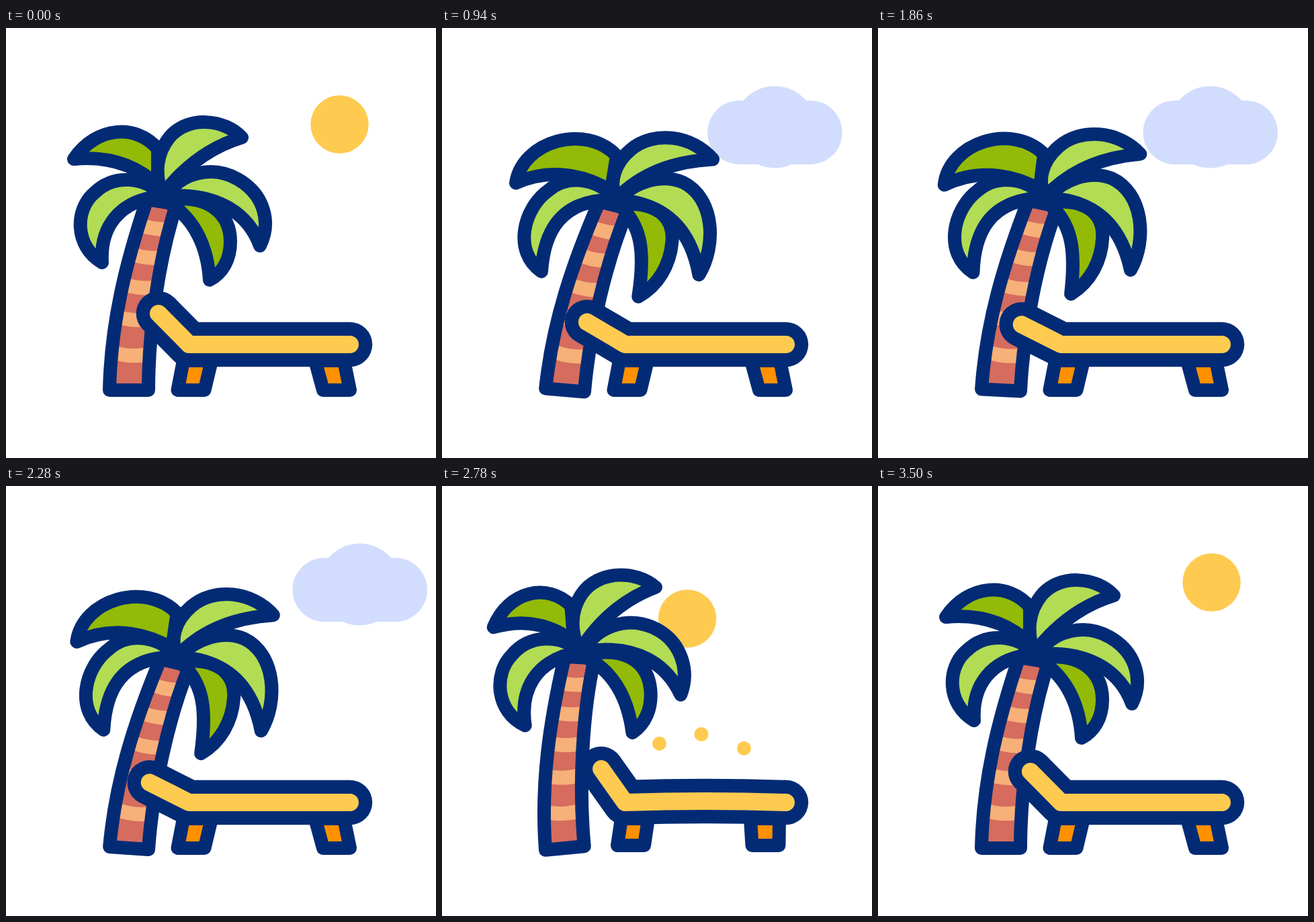
Animation, 640 px wide and 640 px high, one loop 3600 ms. Source, as an HTML page:

```html
<!DOCTYPE html>
<html lang="en">
<head>
<meta charset="utf-8">
<title>Palm and lounger</title>
<style>
  html, body { margin: 0; width: 100%; height: 100%; overflow: hidden; background: #fff; }
  svg { display: block; width: 100vw; height: 100vh; }
  .line { stroke: #032b75; stroke-width: 20; stroke-linejoin: round; stroke-linecap: round; }
  .band { fill: none; stroke: #f7b078; stroke-width: 21; }
  .seat { fill: none; stroke-linecap: round; stroke-linejoin: round; }
  .sun { fill: #fecb50; }
</style>
</head>
<body>
<svg viewBox="0 0 640 640">
  <defs>
    <clipPath id="bark"><path d="M154 539C156 440 178 350 210 255L254 262C228 340 212 450 212 539Z"/></clipPath>
  </defs>
  <circle id="sun" class="sun" r="43.2"/>
  <g id="cloud" fill="#d2ddfd">
    <rect x="394.5" y="108" width="200.5" height="95" rx="47.5"/>
    <circle cx="494.5" cy="147.500" r="61"/>
  </g>
  <g id="palm">
    <g id="trunk" clip-path="url(#bark)">
      <path fill="#d56c5e" d="M120 240H280V560H120Z"/>
    </g>
    <path class="line" fill="none" d="M154 539C156 440 178 350 210 255L254 262C228 340 212 450 212 539Z"/>
    <g id="leaves"></g>
  </g>
  <g id="drops"></g>
  <path id="legL" class="line" fill="#ff9000"/>
  <path id="legR" class="line" fill="#ff9000"/>
  <path id="frame" class="seat" stroke="#032b75" stroke-width="66.5"/>
  <path id="pad" class="seat" stroke="#fecb50" stroke-width="26"/>
</svg>
<script>
const LOOP = 3600;
const $ = id => document.getElementById(id);
const clamp = x => Math.min(1, Math.max(0, x));
const mix = (a, b, k) => a + (b - a) * k;

function add(parent, tag, attrs) {
  const el = document.createElementNS('http://www.w3.org/2000/svg', tag);
  for (const name in attrs) el.setAttribute(name, attrs[name]);
  return parent.appendChild(el);
}

// Smooth interpolation through [time, value] keys.
function track(...keys) {
  return t => {
    if (t <= keys[0][0]) return keys[0][1];
    for (let i = 1; i < keys.length; i++) {
      const [t0, a] = keys[i - 1], [t1, b] = keys[i];
      if (t <= t1) {
        const p = (t - t0) / (t1 - t0);
        return mix(a, b, p * p * (3 - 2 * p));
      }
    }
    return keys[keys.length - 1][1];
  };
}

const lean = track([60, 0], [900, 5], [1330, 0], [2230, 4.4], [2670, -6.5], [3190, 2.5], [3500, 0]);
const droop = track([0, 0], [850, 1], [2290, 1], [2800, .15], [3200, 0]);
const curl = track([2400, 0], [2700, 1], [2800, 1], [3250, 0]);
const recline = track([150, 0], [1260, -18.5], [2300, -18.5], [2720, 10], [3150, -2], [3450, 0]);
const hop = track([2430, 0], [2740, 1.03], [3200, -.25], [3500, 0]);

[[221, 299, 4], [209, 342, 3.5], [199, 387, 3], [190, 435, 2], [184, 488, 2]].forEach(([x, y, tilt]) =>
  add($('trunk'), 'path', { class: 'band', d: `M${x - 30} ${y - 5 - tilt}Q${x} ${y + 4} ${x + 30} ${y - 5 + tilt}` }));

// A leaf blends between a calm and a windblown outline.
const leaves = [];
function leaf(fill, calm, windy) {
  const nums = s => s.match(/[\d.]+/g).map(Number);
  leaves.push({ el: add($('leaves'), 'path', { class: 'line', fill }), calm, a: nums(calm), b: nums(windy) });
}
const DARK = '#92ba07', LIGHT = '#b2dc53';
leaf(DARK, 'M101 195C135 145 195 143 226 180L226 235C195 205 155 190 101 195Z',
           'M84 238C88 175 180 140 230 185L226 238C195 222 140 207 84 238Z');
leaf(LIGHT, 'M235 250C205 220 160 218 132 245C102 270 102 325 143 349C140 300 165 255 235 250Z',
            'M235 250C205 220 160 218 133 245C98 275 88 340 133 366C132 310 150 255 235 250Z');
leaf(DARK, 'M250 255C300 250 334 275 334 318C334 345 322 365 303 375C300 325 280 285 245 262Z',
           'M250 255C300 250 323 272 323 305C323 340 308 372 280 391C284 330 278 290 245 262Z');
leaf(LIGHT, 'M236 252C262 212 310 205 345 225C385 248 395 290 378 324C362 280 320 245 240 250Z',
            'M236 252C258 222 298 205 332 216C380 235 390 305 367 351C352 295 318 250 240 250Z');
leaf(LIGHT, 'M351 163C325 135 270 130 243 163C224 187 221 215 232 250C258 215 295 180 351 163Z',
            'M373 178C340 145 282 142 250 174C227 197 222 225 234 250C262 215 305 187 373 178Z');

const drops = [[323.5, 92], [386, 106], [449.5, 85]].map(([cx, rise]) =>
  ({ rise, el: add($('drops'), 'circle', { class: 'sun', cx, r: 10.5 }) }));

function drawPalm(t) {
  const w = droop(t), c = curl(t);
  $('palm').setAttribute('transform', `rotate(${lean(t)} 183 540)`);
  leaves.forEach(({ el, calm, a, b }, n) => {
    let i = 0;
    el.setAttribute('d', calm.replace(/[\d.]+/g, () => {
      let v = mix(a[i], b[i], w);
      if (n === 0 && i % 2 === 0) v += c * .08 * (226 - v);
      i++;
      return v.toFixed(2);
    }));
  });
}

function drawSky(t) {
  // The sun slips behind the palm and comes back along the same arc.
  const s = t < 1800 ? 1 - clamp(t / 588) ** 3 : 1 - (1 - clamp((t - 2652) / 588)) ** 3;
  $('sun').setAttribute('cx', mix(222, 496.5, s));
  $('sun').setAttribute('cy', mix(232, 143.5, s ** 1.44));
  $('sun').style.display = s > 0 ? '' : 'none';

  const away = t < 1440 ? 1065 - t : t - 1818;
  const dx = Math.min(290, (Math.max(0, away) * .00687) ** 3);
  $('cloud').setAttribute('transform', `translate(${dx} ${-dx / 32})`);
  $('cloud').style.display = dx < 260 ? '' : 'none';
}

function drawChair(t) {
  const k = hop(t), turn = recline(t);
  const ang = (45.3 + turn) * Math.PI / 180, len = 64.8 - turn * (turn > 0 ? .38 : .06);
  const x = 272.5 - len * Math.cos(ang), y = 471 - len * Math.sin(ang);
  const d = `M${x} ${y}L272.5 471Q392 ${471 - 4 * k} 512 471`;
  $('frame').setAttribute('d', d);
  $('pad').setAttribute('d', d);

  const foot = 539 - 4 * k, l = 5.5 * k, r = -10.5 * k;
  $('legL').setAttribute('d', `M${264 + 3 * k} 495L${255.5 + l} ${foot}H${295.5 + l}L${306 + k} 495Z`);
  $('legR').setAttribute('d', `M${460 - k} 495L${472 + r} ${foot}H${512 + r}L${503 - k} 495Z`);

  const p = clamp((t - 2640) / 300);
  drops.forEach(({ el, rise }) => {
    el.setAttribute('cy', 475 - rise * 4 * p * (1 - p));
    el.style.display = p > 0 && p < 1 ? '' : 'none';
  });
}

let start;
function tick(now) {
  start ??= now;
  const t = (now - start) % LOOP;
  drawPalm(t);
  drawSky(t);
  drawChair(t);
  requestAnimationFrame(tick);
}
requestAnimationFrame(tick);
</script>
</body>
</html>
```
